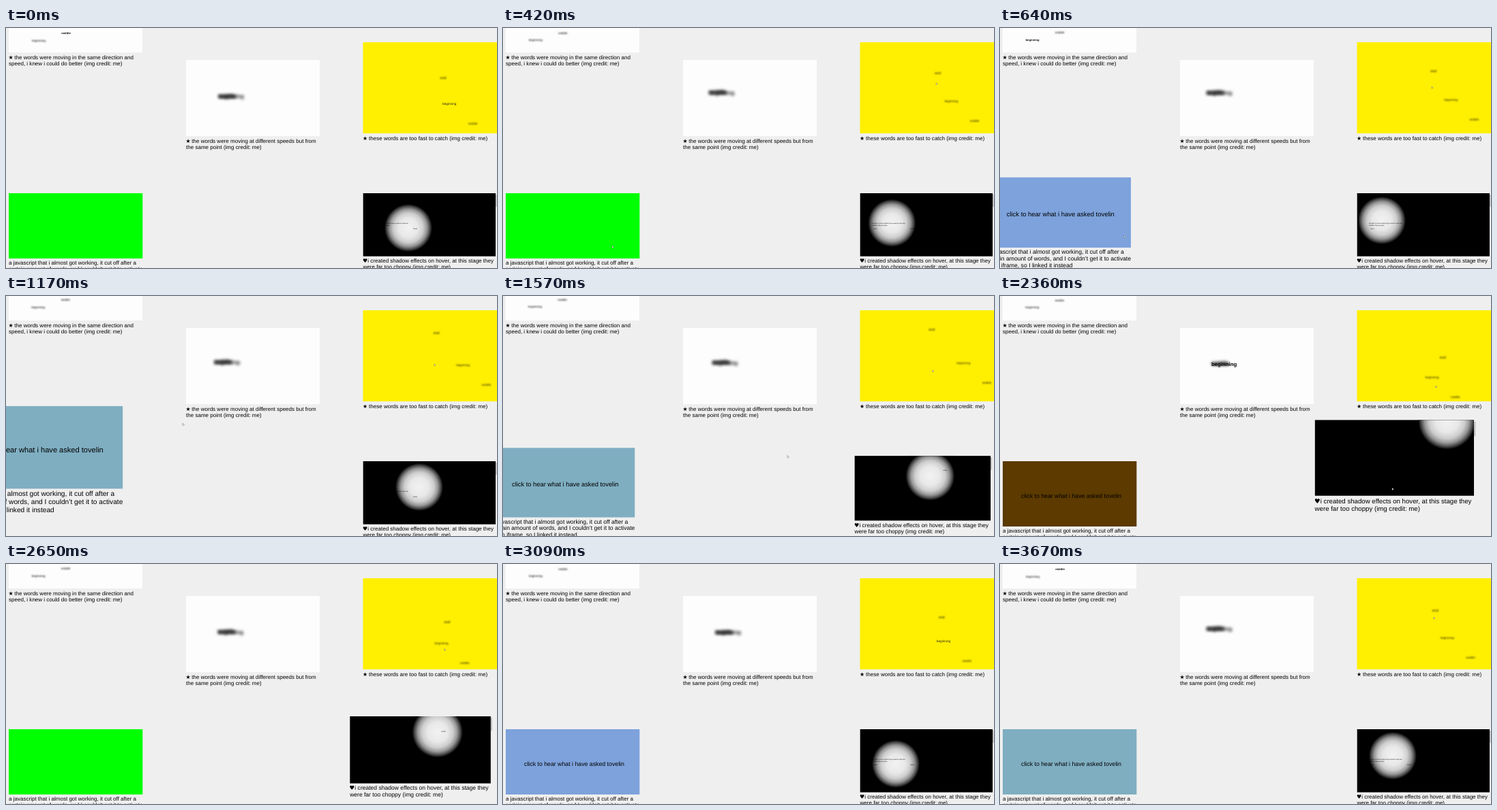
An HTML page with a canvas that plays this animation: 720x353 px, repeating every 3.77 s.

```html
<!DOCTYPE html>
<html lang="en">
<head>
<meta charset="utf-8">
<title>Word experiments</title>
<style>
html, body { margin: 0; width: 100%; height: 100%; overflow: hidden; background: #efefef; }
canvas { display: block; width: 100vw; height: 100vh; }
</style>
</head>
<body>
<canvas id="stage" width="720" height="353"></canvas>
<script>
const ctx = document.getElementById('stage').getContext('2d');
const LOOP = 3770;
const SANS = '"Liberation Sans", Arial, sans-serif';
const TICKS = [0, 120, 300, 420, 540, 640, 770, 940, 1055, 1170, 1350, 1465, 1580, 1700, 1820,
  1920, 2020, 2100, 2360, 2510, 2650, 2790, 2890, 2990, 3090, 3420, 3500, 3590, 3670];

const clamp = v => Math.max(0, Math.min(1, v));
const mod = (a, n) => ((a % n) + n) % n;

// cubic-bezier(.25, .1, .25, 1)
function ease(x) {
  x = clamp(x);
  let lo = 0, hi = 1;
  const bez = (s, a, b) => 3 * s * (1 - s) * (1 - s) * a + 3 * s * s * (1 - s) * b + s * s * s;
  for (let i = 0; i < 24; i++) {
    const mid = (lo + hi) / 2;
    if (bez(mid, .25, .25) < x) lo = mid; else hi = mid;
  }
  return bez(lo, .1, 1);
}

// Linear path through [time, x, y] points
function along(path, t) {
  let i = 1;
  while (i < path.length - 1 && path[i][0] < t) i++;
  const a = path[i - 1], b = path[i];
  const k = clamp((t - a[0]) / (b[0] - a[0]));
  return [a[1] + (b[1] - a[1]) * k, a[2] + (b[2] - a[2]) * k];
}

function rect(color, x, y, w, h) {
  ctx.fillStyle = color;
  ctx.fillRect(x, y, w, h);
}

function text(str, x, y, size, { color = '#000', weight = '', align = 'left', blur = 0 } = {}) {
  ctx.font = `${weight} ${size}px ${SANS}`;
  ctx.textAlign = align;
  ctx.fillStyle = color;
  ctx.filter = blur ? `blur(${blur}px)` : 'none';
  ctx.fillText(str, x, y);
  ctx.filter = 'none';
}

function caption(x, y, lines, mark = '', indent = 0) {
  if (mark) {
    ctx.font = '8px "DejaVu Sans", sans-serif';
    ctx.textAlign = 'left';
    ctx.fillStyle = '#000';
    ctx.fillText(mark, x - .5, y);
  }
  lines.forEach((line, i) => text(line, x + (i ? 0 : indent), y + i * 9.2, 8.04));
}

function pointer(x, y, s = 1) {
  ctx.beginPath();
  ctx.moveTo(x, y);
  ctx.lineTo(x + 2.6 * s, y + 2.6 * s);
  ctx.lineTo(x + 1.2 * s, y + 2.8 * s);
  ctx.lineTo(x, y + 3.8 * s);
  ctx.closePath();
  ctx.fillStyle = '#fff';
  ctx.fill();
  ctx.strokeStyle = '#444';
  ctx.lineWidth = .4;
  ctx.stroke();
}

function clipped(x, y, w, h, draw) {
  ctx.save();
  ctx.beginPath();
  ctx.rect(x, y, w, h);
  ctx.clip();
  draw();
  ctx.restore();
}

function zoomed(px, py, k, draw) {
  ctx.save();
  ctx.translate(px, py);
  ctx.scale(k, k);
  ctx.translate(-px, -py);
  draw();
  ctx.restore();
}

function sameSpeed(t) {
  rect('#fdfdfd', 4, 0, 196, 36);
  const d = Math.cos((t + 250) / LOOP * Math.PI * 2);
  const word = (str, x, y, sharp) => text(str, x + d * .5, y + d * 1.1, 4.2, {
    weight: 'bold', align: 'center', color: sharp ? '#111' : '#333', blur: sharp ? 0 : 1
  });
  clipped(4, 0, 196, 36, () => {
    word('middle', 87.5, 8.2, t < 200 || t > 3550);
    word('beginning', 47.5, 18.5, t > 500 && t < 900);
  });
  caption(4, 46, ['the words were moving in the same direction and',
    'speed, i knew i could do better (img credit: me)'], '★', 8.3);
}

const DRIFT = [[300, 320.5, 94.5], [640, 322, 95.4], [1170, 324.5, 97], [1920, 328, 99],
  [2400, 329.2, 99.6], [3030, 330.5, 100.5]];

function samePoint(t) {
  rect('#fdfdfd', 264, 47, 196, 112);
  const u = mod(t, 3030);
  const [x, y] = u < 300 ? [330.5, 100.5] : along(DRIFT, u);
  const sharp = t > 2250 && t < 2600;
  const soft = { weight: 'bold', blur: 2 };
  text('middle', x - 19, y + 2.5, 7.8, soft);
  text('middle', x - 18, y + 2, 7.8, soft);
  if (sharp) text('beginning', 310, 103.2, 7.8, { weight: 'bold' });
  else text('beginning', x - 19, y + 2.8, 7.8, soft);
  caption(264, 169, ['the words were moving at different speeds but from',
    'the same point (img credit: me)'], '★', 8.3);
}

const CHASE = [[0, 645, 140], [.86, 639, 132], [1.6, 649, 113], [1.84, 651, 111],
  [2.17, 636, 78], [3.01, 628, 100], [3.34, 630, 110]];

function tooFast(t) {
  rect('#ffef00', 523.5, 21, 196.5, 134);
  const u = mod(t - 1500, 3340) / 1000;
  const soft = { weight: 'bold', align: 'center', color: '#4a4500', blur: 1.2 };
  const bx = 619 + 17 * u, by = 126.5 - 8.4 * u;
  clipped(523.5, 21, 196.5, 134, () => {
    text('end', 656.5 - 8.4 * u, 106.5 - 16.9 * u, 5, soft);
    text('middle', bx + 34.2, by + 30.5, 4.2, soft);
    if (u > 1.5 && u < 2) text('beginning', bx, by + 1.5, 4.7, { align: 'center', color: '#222' });
    else {
      text('beginning', bx, by + 1.5, 4.2, soft);
      pointer(...along(CHASE, u), .8);
    }
  });
  caption(523.5, 165, ['these words are too fast to catch (img credit: me)'], '★', 8.5);
}

function panelColor(t) {
  const u = mod(t - 2510, 2600);
  return u < 530 ? '#00ff00' : u < 1070 ? '#7da2dc' : u < 1680 ? '#7faec1' : '#5c3a00';
}

function colorPanel(t) {
  const k = t < 1180
    ? 1 + .28 * ease((t - 450) / 1000)
    : 1 + .26 * (1 - ease((t - 1170) / 650));
  zoomed(310, 548, k, () => {
    const color = panelColor(t);
    rect(color, 4, 243, 196.3, 96);
    if (color !== '#00ff00') text('click to hear what i have asked tovelin', 31, 296.5, 8.76);
    caption(4, 347.6, ['a javascript that i almost got working, it cut off after a',
      'certain amount of words, and I couldn\u2019t get it to activate',
      'in an iframe, so I linked it instead']);
  });
}

const BEAM = [[0, 590, 294], [640, 560, 283], [1170, 606, 281], [1920, 671, 258], [2360, 685, 244],
  [2790, 625, 275], [3090, 576, 294], [3670, 576, 282]];

function spotlight(t) {
  const k = 1 + .2 * (t < 2400 ? ease((t - 1350) / 950) : 1 - ease((t - 2400) / 620));
  zoomed(833, 546, k, () => {
    rect('#c4c4c4', 718, 245, 2, 18);
    rect('#000', 523.7, 243, 194.3, 92.8);
    const [x, y] = along(BEAM, t);
    const glow = ctx.createRadialGradient(x, y, 0, x, y, 35);
    [[0, 242], [.4, 232], [.62, 205], [.78, 150], [.9, 75], [1, 0]].forEach(([at, v]) =>
      glow.addColorStop(at, `rgb(${v},${v},${v})`));
    clipped(523.7, 243, 194.3, 92.8, () => {
      rect(glow, x - 35, y - 35, 70, 70);
      text('the light is on the words that you want to read now', 541, 287.6, 2.2);
      text('and then they are gone', 541, 290.8, 2.2);
      text('hover', 543, 296, 2.2);
      text('shade', 597, 296, 2.2);
      text('words', 650, 264.3, 2.2);
    });
    caption(523.5, 345, ['i created shadow effects on hover, at this stage they',
      'were far too choppy (img credit: me)'], '♥', 6.8);
  });
}

const HAND = [[420, 160, 320], [640, 182, 305], [770, 184, 305], [1170, 259, 187], [1350, 259, 187],
  [1580, 575, 282], [2510, 575, 282]];

function draw(t) {
  rect('#efefef', 0, 0, 720, 353);
  sameSpeed(t);
  samePoint(t);
  tooFast(t);
  colorPanel(t);
  spotlight(t);
  if (t >= 420 && t <= 2510) pointer(...along(HAND, t));
}

ctx.textRendering = 'geometricPrecision';
const start = performance.now();
function frame() {
  const t = (performance.now() - start) % LOOP;
  draw(TICKS.filter(v => v <= t).pop() || 0);
  requestAnimationFrame(frame);
}
frame();
</script>
</body>
</html>
```
